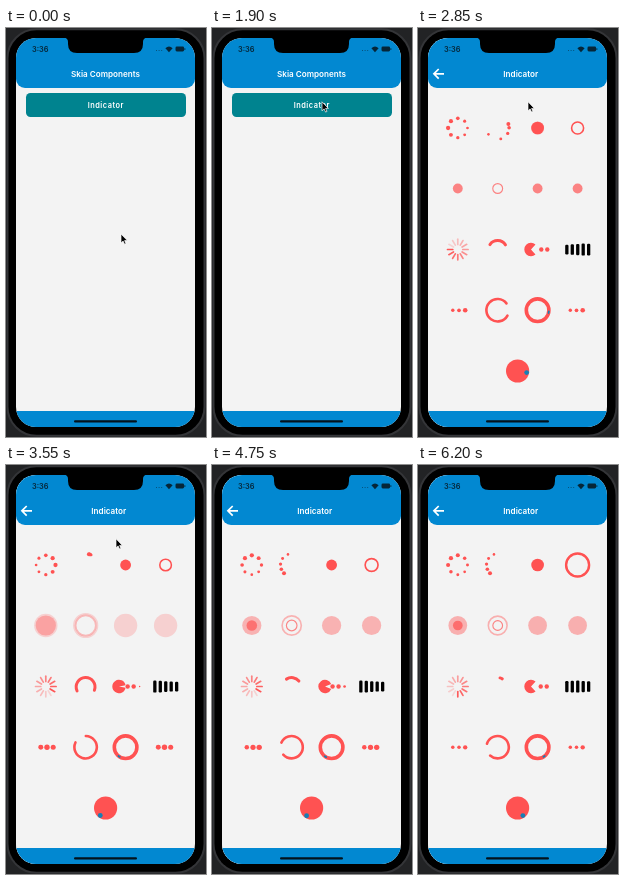
Recreate the animation shown at these times as an HTML page. Size 200x409 px, loop 6.25 s.

```html
<!DOCTYPE html>
<html lang="en">
<head>
<meta charset="utf-8">
<title>Indicators</title>
<style>
html, body { margin: 0; width: 100%; height: 100%; overflow: hidden; background: #1b1b1b; }
svg { display: block; width: 100%; height: 100%; }
text { font-family: Inter, Roboto, sans-serif; font-weight: 600; text-anchor: middle; }
</style>
</head>
<body>
<svg viewBox="0 0 200 409">
  <defs>
    <clipPath id="screen"><rect x="10" y="10" width="179" height="389" rx="20"/></clipPath>
  </defs>
  <rect width="200" height="409" fill="#222325"/>
  <rect x="1.5" y="1.2" width="197" height="406.6" rx="29" fill="#000" stroke="#343538" stroke-width="2"/>
  <g clip-path="url(#screen)">
    <g id="home">
      <rect x="10" y="10" width="180" height="389" fill="#f3f3f3"/>
      <rect x="10" y="-10" width="179" height="70" rx="9" fill="#0288d1"/>
      <text x="99.5" y="48.7" font-size="8.15" fill="#fff">Skia Components</text>
      <g id="button">
        <rect x="20" y="65" width="160" height="24" rx="4.5" fill="#00838f"/>
        <text x="99.8" y="79.8" font-size="7.4" letter-spacing=".5" fill="#fff">Indicator</text>
      </g>
    </g>
    <g id="page">
      <rect x="10" y="10" width="180" height="389" fill="#f3f3f3"/>
      <rect x="10" y="-10" width="179" height="70" rx="9" fill="#0288d1"/>
      <text x="102.8" y="48.7" font-size="8.15" fill="#fff">Indicator</text>
      <path d="M26 45.8H16M20.7 41L15.9 45.8L20.7 50.6" fill="none" stroke="#fff" stroke-width="1.7"/>
      <g id="spinners"></g>
    </g>
    <rect x="10" y="383" width="180" height="17" fill="#0288d1"/>
  </g>
  <path d="M58 9.5Q62 10 62 14V16Q62 25 71 25H128Q137 25 137 16V14Q137 10 141 9.5Z"/>
  <g fill="#062638">
    <text x="34.3" y="24" font-size="7.4">3:36</text>
    <path d="M150 22.5h1M152.6 22.5h1M155.2 22.5h1" stroke="#06527c" stroke-width="1"/>
    <path d="M159.4 20.2Q163 17 166.6 20.2L163 24.2Z"/>
    <rect x="169.5" y="18.6" width="8.6" height="4.9" rx="1.4"/>
    <rect x="178.5" y="20.2" width=".8" height="1.8"/>
  </g>
  <rect x="68" y="392.3" width="63" height="2.2" rx="1.1" fill="#03121c"/>
  <path id="cursor" d="M0 0V9L2.1 7.1L3.6 10.3L5 9.6L3.6 6.6H6.4Z" fill="#000" stroke="#fff" stroke-width=".7"/>
</svg>
<script>
const LOOP = 6250, RED = '#ff5252', BLUE = '#167fb4';
const $ = id => document.getElementById(id);
const { PI, sin, cos, min, max } = Math;
const clamp = v => min(1, max(0, v));
const frac = v => v - Math.floor(v);
const smooth = v => (v = clamp(v), v * v * (3 - 2 * v));
const mix = (a, b, u) => a + (b - a) * u;
const n = v => v.toFixed(2);

// Interpolates between [time, value] pairs.
function track(keys, t, ease = clamp) {
  let i = 0;
  while (i < keys.length - 2 && t > keys[i + 1][0]) i++;
  const [t0, a] = keys[i], [t1, b] = keys[i + 1];
  return mix(a, b, ease((t - t0) / (t1 - t0)));
}

// Angles are in degrees, clockwise from the top.
const polar = (x, y, r, a) => [x + r * sin(a * PI / 180), y - r * cos(a * PI / 180)];
const disc = (x, y, r, alpha = 1, color = RED) =>
  `<circle cx="${n(x)}" cy="${n(y)}" r="${n(max(0, r))}" fill="${color}" opacity="${n(alpha)}"/>`;
const ring = (x, y, r, w, alpha = 1) =>
  `<circle cx="${x}" cy="${y}" r="${n(max(0, r))}" fill="none" stroke="${RED}" stroke-width="${n(w)}" opacity="${n(alpha)}"/>`;
const line = (p, q, w, color, alpha = 1) =>
  `<path d="M${p.map(n)}L${q.map(n)}" stroke="${color}" stroke-width="${w}" stroke-linecap="round" opacity="${n(alpha)}"/>`;
function arc(x, y, r, from, to, w, color = RED) {
  const a = polar(x, y, r, from).map(n), b = polar(x, y, r, to).map(n);
  return `<path d="M${a}A${r} ${r} 0 ${to - from > 180 ? 1 : 0} 1 ${b}" fill="none" stroke="${color}" stroke-width="${w}" stroke-linecap="round"/>`;
}
const times = (count, draw) => Array.from({ length: count }, (_, i) => draw(i)).join('');

const BREATH = [[2100, 1], [2500, 11], [2850, 6], [3200, 1.5], [3550, 5.8], [3900, 11.3],
  [4200, 6], [4550, 1.5], [4950, 11.3], [5300, 2.3], [5700, 1], [6200, 11.5]];
const ARC_START = [[2200, 65], [2850, 305], [3550, 605], [4200, 805], [5300, 1288], [6200, 1455]];
const GAP = [[2200, -75], [2850, 85], [3550, 328], [4200, 480], [5300, 762], [6200, 975]];
const MARK = [[2200, 0], [2850, 100], [3550, 215], [4200, 375], [5300, 770], [6200, 865]];

const ballRing = t => times(8, i => {
  const [x, y] = polar(39.8, 100, 9.7, i * 45);
  return disc(x, y, 1.75 + .4 * cos(2 * PI * (t / 1600 - i / 8)));
});

function chase(t) {
  const u = clamp((frac((t - 5300) / 1450 + .05) - .05) / .81);
  return times(5, i => {
    const [x, y] = polar(79.8, 100, 11.3, 33 + 360 * u ** (2.4 - i * .45));
    return disc(x, y, 2 - i * .18);
  });
}

function pulse(t) {
  const p = frac((t - 2400) / 1200), v = clamp((p - .375) / .5);
  const halo = v > 0 && v < 1 ? disc(119.6, 100, mix(6.5, 12, 1 - (1 - v) ** 5), .42 * (1 - v)) : '';
  return halo + disc(119.6, 100, 5.7 + .8 * cos(2 * PI * (p - .27)));
}

function breath(t) {
  const r = track(BREATH, t, smooth);
  return ring(159.6, 100, r, .7 + r * .15);
}

function wave(t, x, count, outline) {
  const p = frac((t - 3550) / 1472 + .78);
  return times(count, i => {
    const u = clamp((p - i * .4) / (1 - i * .4));
    if (!u) return '';
    const r = 12.6 * sin(u ** 1.15 * PI / 2), alpha = 1 - u;
    return outline ? ring(x, 160.5, r, .6 + r * .11, alpha) : disc(x, 160.5, r, alpha);
  });
}

const spokes = t => times(12, i => {
  const a = i * 30, fade = frac((t - 3550) / 1200 + (130 - a) / 360);
  return line(polar(39.8, 221.5, 5, a), polar(39.8, 221.5, 10.3, a), 1.7, RED, 1 - .85 * fade);
});

function sweep(t) {
  const p = frac((t - 2200) / 2000), peak = .56;
  const span = p < peak ? 15 + 285 * (p / peak) ** 2 : mix(300, 15, (p - peak) / (1 - peak));
  const from = track(ARC_START, t);
  return arc(79.6, 222, 9.4, from, from + span, 3);
}

function muncher(t) {
  const jaw = 25 + 23 * cos(2 * PI * (t - 2850) / 1100);
  const a = polar(113, 221.5, 6.7, 90 + jaw).map(n), b = polar(113, 221.5, 6.7, 90 - jaw).map(n);
  const shift = 6 * frac((t - 2850) / 550 + .5);
  return times(3, i => {
    const x = 126.3 + i * 6 - shift;
    return x > 134 ? '' : disc(x, 221.5, min(2.2, (135 - x) * .55));
  }) + `<path d="M113 221.5L${a}A6.7 6.7 0 1 1 ${b}Z" fill="${RED}"/>`;
}

const bars = t => times(5, i => {
  const h = 10.8 + 1.2 * cos(2 * PI * ((t - 3550) / 1200 - i / 8));
  return `<rect x="${n(147.2 + i * 5.45)}" y="${n(221.6 - h / 2)}" width="3.3" height="${n(h)}" rx="1.2"/>`;
});

const dots = (t, x) => times(3, i =>
  disc(x + (i - 1) * 6.2, 282.3, 2.2 + .5 * cos(2 * PI * ((t - 3550) / 1100 - (i - 1) * .15))));

function spinners(t) {
  const gap = track(GAP, t), mark = track(MARK, t);
  const [mx, my] = polar(99.6, 343, 9.2, mark);
  return ballRing(t) + chase(t) + pulse(t) + breath(t)
    + wave(t, 39.8, 2) + wave(t, 79.7, 2, true) + wave(t, 119.6, 1) + wave(t, 159.6, 1)
    + spokes(t) + sweep(t) + muncher(t) + bars(t)
    + dots(t, 41) + arc(79.6, 282.2, 11.2, gap + 33, gap + 327, 2.6)
    + ring(119.6, 282.2, 11.3, 3.6) + arc(119.6, 282.2, 11.3, mark - 4, mark + 4, 1.8, BLUE)
    + dots(t, 158.5) + disc(99.6, 343, 11.6) + disc(mx, my, 2.4, 1, BLUE);
}

function draw(t) {
  const u = clamp((t - 2150) / 550), slide = 1 - (1 - u) ** 4;
  $('home').setAttribute('transform', `translate(${n(-54 * slide)})`);
  $('page').setAttribute('transform', `translate(${n(180 * (1 - slide))})`);
  $('page').setAttribute('visibility', u > 0 ? 'visible' : 'hidden');
  $('button').setAttribute('opacity', t > 2090 ? .5 : 1);
  $('spinners').innerHTML = u > 0 ? spinners(t) : '';

  const go = smooth((t - 1320) / 560), leave = clamp((t - 4400) / 250) ** 2;
  const x = mix(115, 110, go), y = mix(206, 73.8, go) - 56 * leave;
  $('cursor').setAttribute('transform', `translate(${n(x)} ${n(y)})`);
  $('cursor').setAttribute('visibility', t < 4700 ? 'visible' : 'hidden');
}

const begin = performance.now();
function tick() {
  draw((performance.now() - begin) % LOOP);
  requestAnimationFrame(tick);
}
tick();
</script>
</body>
</html>
```
